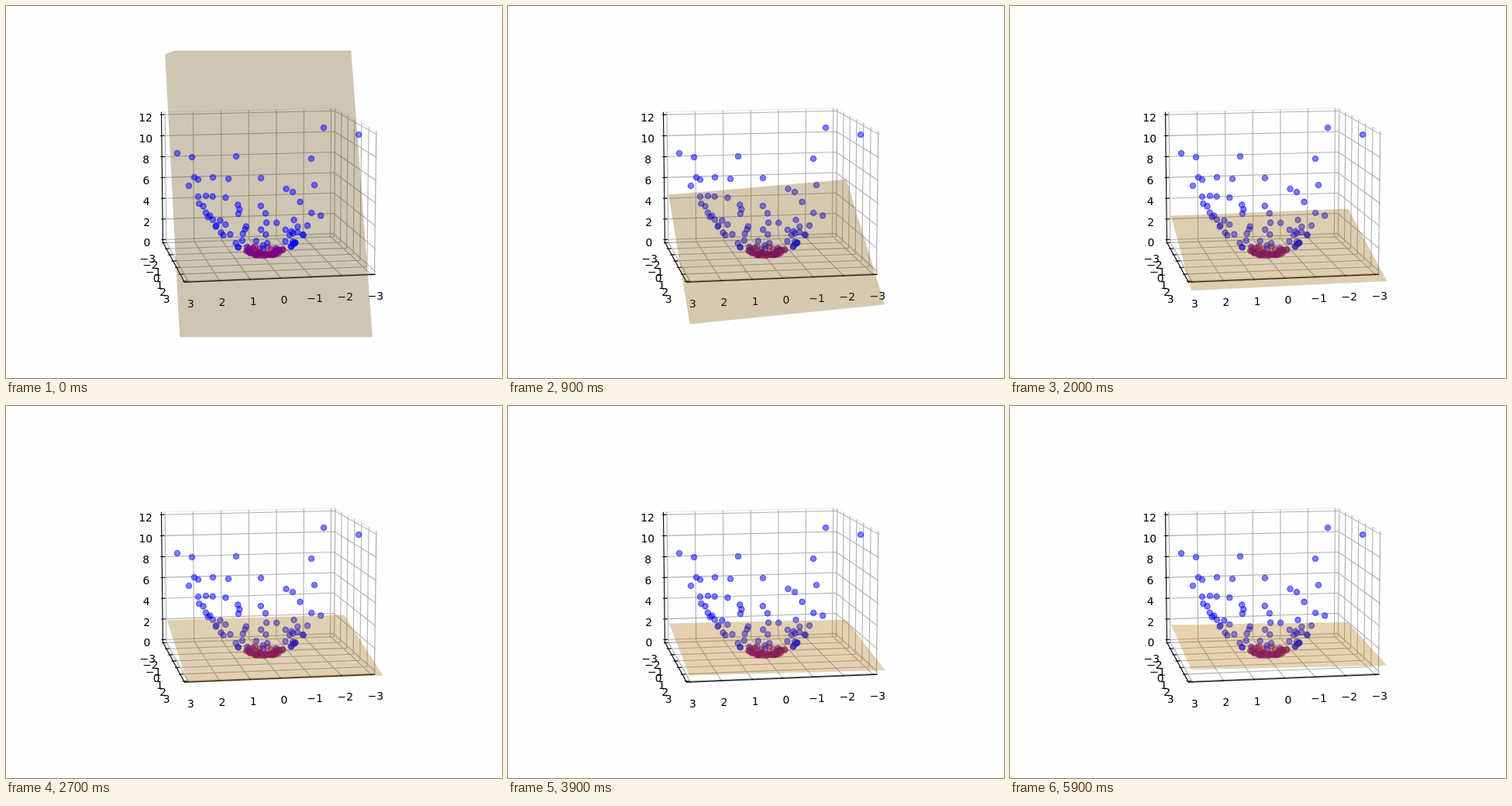
These frames come from a looping animation (640x480 px, 6000 ms). An HTML page with a canvas:

```html
<!DOCTYPE html>
<html>
<head>
<meta charset="utf-8">
<style>
html, body { margin: 0; width: 100%; height: 100%; overflow: hidden; background: #fefefe; }
canvas { display: block; }
</style>
</head>
<body>
<canvas id="stage" width="640" height="480"></canvas>
<script>
const ctx = document.getElementById('stage').getContext('2d');
const STEP = 100, STEPS = 60;

// Camera: 10 degrees up, 80 degrees round, 10 units away
const ELEV = Math.PI / 18, AZIM = Math.PI * 4 / 9, DIST = 10, ZOOM = 1998;
const SIDE = .5953, HEIGHT = .4465;   // half sizes of the box
const EDGE = 3.125, LOW = -.25, HIGH = 12.25;   // data limits

const sinE = Math.sin(ELEV), cosE = Math.cos(ELEV);
const sinA = Math.sin(AZIM), cosA = Math.cos(AZIM);

// Data coordinates to screen; the offsets are in box units
function project(x, y, z, dx = 0, dy = 0, dz = 0) {
  const X = x / EDGE * SIDE + dx, Y = y / EDGE * SIDE + dy;
  const Z = (z - 6) / 6.25 * HEIGHT + dz;
  const side = Y * cosA - X * sinA, near = X * cosA + Y * sinA;
  const scale = ZOOM / (DIST - near * cosE - Z * sinE);
  return [333 + side * scale, 237.4 - (Z * cosE - near * sinE) * scale];
}

function path(points) {
  ctx.beginPath();
  points.forEach(p => ctx.lineTo(...p));
}

function line(...points) {
  path(points.map(p => project(...p)));
  ctx.stroke();
}

function label(value, [x, y]) {
  ctx.fillText(String(value).replace('-', '\u2212'), x, y + 5);
}

function drawAxes() {
  const E = EDGE, GAP = .108, IN = .02, OUT = .01;
  ctx.lineWidth = .8;
  ctx.strokeStyle = '#e6e6e6';
  line([E, -E, HIGH], [-E, -E, HIGH], [-E, E, HIGH], [-E, E, LOW], [-E, -E, LOW], [-E, -E, HIGH]);
  line([E, -E, LOW], [-E, -E, LOW]);

  ctx.lineWidth = 1.11;
  ctx.strokeStyle = '#b0b0b0';
  for (let v = -3; v <= 3; v++) {
    const z = 6 + 2 * v;
    line([v, -E, HIGH], [v, -E, LOW], [v, E, LOW]);
    line([-E, v, HIGH], [-E, v, LOW], [E, v, LOW]);
    line([E, -E, z], [-E, -E, z], [-E, E, z]);
  }

  ctx.strokeStyle = ctx.fillStyle = '#000';
  ctx.font = '13.89px "DejaVu Sans", sans-serif';
  ctx.textAlign = 'center';
  line([E, -E, HIGH], [E, -E, LOW], [E, E, LOW], [-E, E, LOW]);
  for (let v = -3; v <= 3; v++) {
    const z = 6 + 2 * v, [zx, zy] = project(E, -E, z);
    line([v, E, LOW, 0, OUT], [v, E, LOW, 0, -IN]);
    line([E, v, LOW, OUT], [E, v, LOW, -IN]);
    line([E, -E, z, OUT], [E, -E, z, -IN]);
    label(v, project(v, E, LOW, 0, GAP, -GAP));
    label(v, project(E, v, LOW, GAP, 0, -GAP));
    label(z, [zx - 20.5, zy + 4]);
  }
}

let seed = 11;
const rand = () => (seed = seed * 16807 % 2147483647) / 2147483647;

// Points on the bowl z = x² + y², evenly spread in height with random angles
function bowl(count, height) {
  return Array.from({ length: count }, (_, i) => {
    const z = height((i + .5) / count), turn = 2 * Math.PI * rand();
    return project(Math.sqrt(z) * Math.cos(turn), Math.sqrt(z) * Math.sin(turn), z);
  });
}

const outer = [
  [410, 157], [455, 166], [394, 197], [221, 190], [240, 195], [297, 194],
  [243, 221], [248, 224], [267, 221], [287, 223], [329, 222], [236, 232],
  [398, 231], [370, 240], [248, 246], [258, 245]
];
const inner = bowl(60, u => .8 - 2.9 * Math.log(1 - .78 * u));
const core = bowl(54, u => .45 * u);

function dots(points, color) {
  ctx.fillStyle = ctx.strokeStyle = color;
  ctx.lineWidth = 1.39;
  points.forEach(([x, y]) => {
    ctx.beginPath();
    ctx.arc(x, y, 3.6, 0, 7);
    ctx.fill();
    ctx.stroke();
  });
}

function drawPoints() {
  dots(outer, 'rgba(0,0,255,.5)');
  dots(inner, 'rgba(0,0,255,.5)');
  dots(core, 'rgba(128,0,128,.5)');
}

// The plane z = a + bx + cy flattens by a power law
function drawPlane(step) {
  const c = -7 * (1 + step / 5) ** -1.5;
  const b = .15 * c + .075;
  const a = .56 + .0068 * step;
  const light = (2 * b + 2 * c + 1) / 3 / Math.hypot(b, c, 1);
  const shade = .585 + .29 * light;
  const corners = [[3, -2.87], [-3.45, -2.87], [-3.45, 2.87], [3, 2.87]];
  ctx.save();
  ctx.beginPath();
  ctx.rect(80, 57.6, 496, 369.6);
  ctx.clip();
  ctx.fillStyle = `rgba(${255 * shade},${165 * shade},0,.3)`;
  path(corners.map(([x, y]) => project(x, y, a + b * x + c * y)));
  ctx.fill();
  ctx.restore();
}

function draw(step) {
  ctx.fillStyle = '#fefefe';
  ctx.fillRect(0, 0, 640, 480);
  drawAxes();
  // A steep plane lies behind the points, a flatter one in front
  const layers = [drawPlane, drawPoints];
  if (step > 1) layers.reverse();
  layers.forEach(layer => layer(step));
}

let shown = -1;
function tick() {
  const step = Math.floor(performance.now() / STEP) % STEPS;
  if (step !== shown) draw(shown = step);
  requestAnimationFrame(tick);
}
tick();
</script>
</body>
</html>
```
